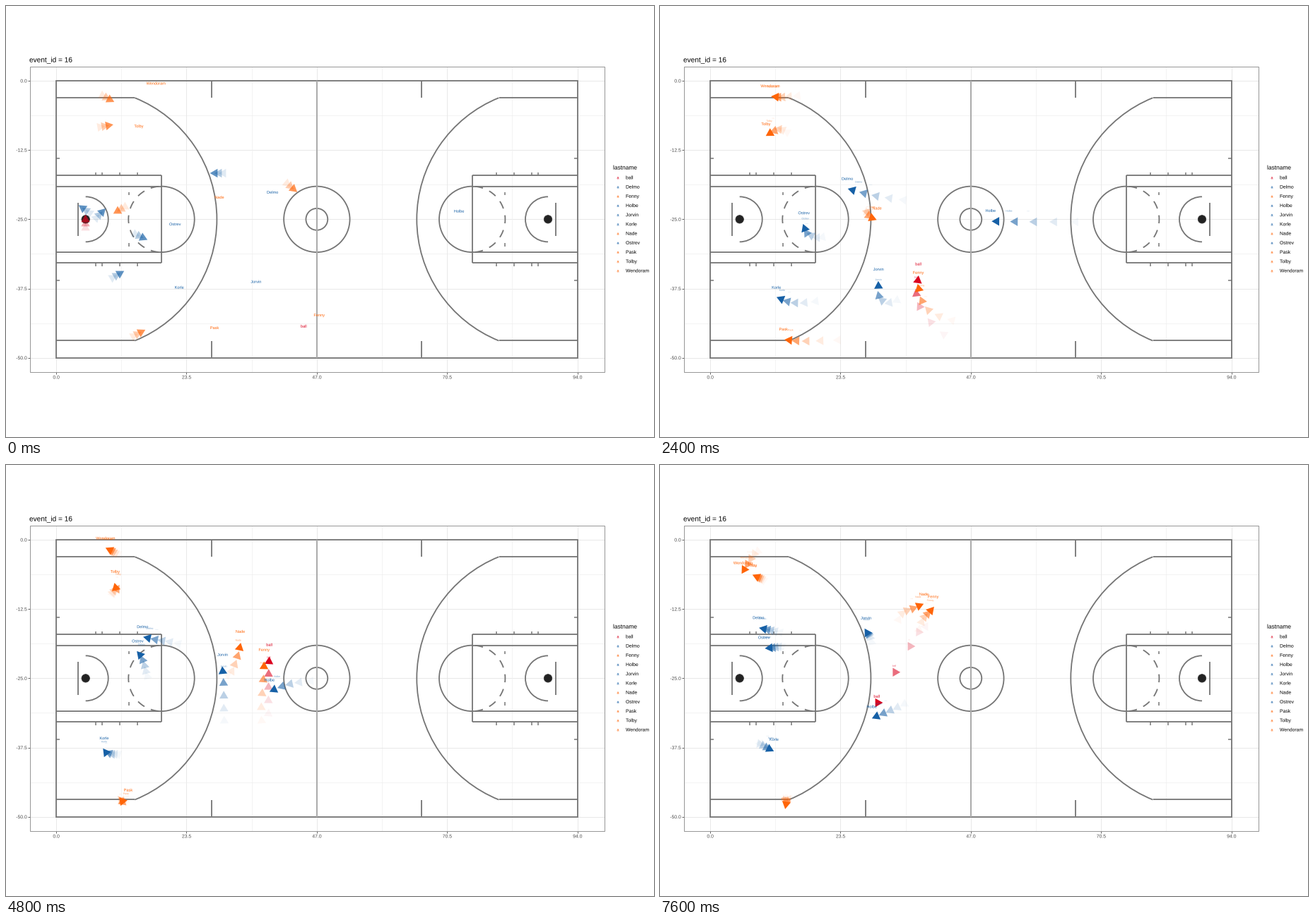
Recreate the animation shown at these times as a matplotlib script. Size 917 by 611 pixels, loop 8 s.

```python
import numpy as np
import matplotlib.pyplot as plt
from matplotlib.animation import FuncAnimation
from matplotlib.patches import Arc, Circle, PathPatch, Polygon, Rectangle
from matplotlib.textpath import TextPath
from matplotlib.transforms import Affine2D

W, H, DPI = 917, 611, 64
FRAMES, INTERVAL = 20, 400
PT = 72 / DPI  # points per pixel

BLUE, ORANGE, RED = "#1660A6", "#FF6508", "#DB0420"
COURT = "#747474"
WAKE_ALPHA = [1, 0.58, 0.29, 0.12, 0.04, 0]
WAKE_TEXT = [1, 0.62, 0.27]

plt.rcParams["font.family"] = "Liberation Sans"
fig = plt.figure(figsize=(W / DPI, H / DPI), dpi=DPI, facecolor="white")
ax = fig.add_axes([0, 0, 1, 1])
ax.set(xlim=(0, W), ylim=(H, 0))
ax.axis("off")


def text(x, y, s, size, color="black", align=0, alpha=1):
    """Outlined text; align is the share of its width left of x."""
    path = TextPath((0, 0), s, size=size)
    x -= align * path.get_extents().x1
    place = Affine2D().scale(1, -1).translate(x, y + 0.36 * size)
    return ax.add_patch(PathPatch(path.transformed(place), fc=color, lw=0,
                                  alpha=alpha, zorder=6))


def line(xs, ys, color=COURT, width=1.8, z=2):
    ax.plot(xs, ys, color=color, lw=width * PT, zorder=z,
            solid_capstyle="butt", solid_joinstyle="miter")


def arc(x, y, r, start=0, end=360):
    """Arc in degrees, counted clockwise on screen."""
    ax.add_patch(Arc((x, y), 2 * r, 2 * r, theta1=start, theta2=end,
                     color=COURT, lw=1.8 * PT, zorder=2))


def triangle(x, y, angle, color, alpha, r=7.2):
    """Triangle pointing along angle, its bounding box centred on x, y."""
    a = angle + np.radians([0, 120, 240])
    pts = r * np.column_stack([np.cos(a), -np.sin(a)])
    pts += (x, y) - (pts.min(axis=0) + pts.max(axis=0)) / 2
    return ax.add_patch(Polygon(pts, fc=color, ec="none", alpha=alpha, zorder=5))


# ---- panel, grid, axes --------------------------------------------------
LEFT, RIGHT, TOP, BOTTOM = 71, 808.7, 106, 498.7
MID_X, MID_Y = (LEFT + RIGHT) / 2, (TOP + BOTTOM) / 2


def draw_panel():
    x0, x1, y0, y1 = 33.5, 846.8, 86, 519
    for i in range(9):
        major = i % 2 == 0
        color, width = ("#E6E6E6", 0.9) if major else ("#EEEEEE", 0.7)
        x = LEFT + (RIGHT - LEFT) * i / 8
        y = TOP + (BOTTOM - TOP) * i / 8
        line([x, x], [y0, y1], color, width, 1)
        line([x0, x1], [y, y], color, width, 1)
        if major:
            line([x, x], [y1, y1 + 3], "#555555", 0.9)
            line([x0 - 3, x0], [y, y], "#555555", 0.9)
            text(x, 526, f"{94 * i / 8:.1f}", 6.8, "#4D4D4D", 0.5)
            text(29.5, y, f"{-50 * i / 8 if i else 0:.1f}", 6.8, "#4D4D4D", 1)
    ax.add_patch(Rectangle((x0, y0), x1 - x0, y1 - y0, fill=False,
                           ec="#8C8C8C", lw=0.9 * PT, zorder=3))
    text(33, 76, "event_id = 16", 10.1)


# ---- court --------------------------------------------------------------
def draw_half(flip):
    """One end of the court; flip mirrors it to the right side."""
    def fx(x):
        return LEFT + RIGHT - x if flip else x

    def seg(xa, ya, xb, yb, width=1.8):
        line([fx(xa), fx(xb)], [MID_Y + ya, MID_Y + yb], width=width)

    def side_arc(x, r, start, end):
        if flip:
            start, end = 180 - end, 180 - start
        arc(fx(x), MID_Y, r, start, end)

    hoop, lane = 112.7, 220
    for s in (-1, 1):
        seg(LEFT, 62 * s, lane, 62 * s)
        seg(LEFT, 46.5 * s, lane, 46.5 * s)
        seg(LEFT, 172 * s, 182, 172 * s)
        seg(291.3, 172.3 * s, 291.3, 196 * s)
        seg(LEFT, 86.8 * s, 75.5, 86.8 * s, 1.5)
        seg(174, 34 * s, 174, 38.3 * s, 1.5)
        for x in (127, 136, 161, 185.7):
            seg(x, 62 * s, x, 66.5 * s, 1.5)
    seg(lane, -62, lane, 62)
    seg(102, -23.7, 102, 23.7)
    side_arc(hoop, 32, -90, 90)
    side_arc(hoop, 185.7, -68, 68)
    side_arc(lane, 46.7, -90, 90)
    for k in range(-3, 4):
        dash = 180 + 26 * k
        side_arc(lane, 46.7, dash - 7, dash + 7)
    ax.add_patch(Circle((fx(hoop), MID_Y), 5.7, fc="#222222", ec="#3A3A3A",
                        lw=0.8 * PT, zorder=4))


def draw_court():
    ax.add_patch(Rectangle((LEFT, TOP), RIGHT - LEFT, BOTTOM - TOP, fill=False,
                           ec=COURT, lw=1.8 * PT, zorder=2))
    draw_half(False)
    draw_half(True)
    arc(MID_X, MID_Y, 46.7)
    arc(MID_X, MID_Y, 15.4)
    line([MID_X, MID_X], [TOP, BOTTOM], "#ABABAB", 2)


# ---- moving parts -------------------------------------------------------
def smooth_path(times, points):
    """Position in every frame on a cubic curve through a few points."""
    t, p = np.array(times), np.array(points, float)
    slope = np.gradient(p, t, axis=0)
    f = np.arange(FRAMES)
    i = np.clip(np.searchsorted(t, f, "right") - 1, 0, len(t) - 2)
    span = (t[i + 1] - t[i])[:, None]
    u = (f - t[i])[:, None] / span
    return ((1 + 2 * u) * (1 - u) ** 2 * p[i] + u * (1 - u) ** 2 * span * slope[i]
            + u * u * (3 - 2 * u) * p[i + 1] + u * u * (u - 1) * span * slope[i + 1])


class Mover:
    """A named marker that faces the way it travels and leaves a fading wake.

    before is where it ended the previous play: x, y and travel direction.
    """

    def __init__(self, name, color, before, points, times=(0, 4, 8, 12, 15, 19)):
        self.name, self.color, self.before = name, color, before
        self.pos = smooth_path(times, points)
        dx, dy = np.gradient(self.pos, axis=0).T
        self.angle = np.arctan2(-dy, dx)

    def marker(self, f, age):
        return triangle(*self.pos[f], self.angle[f], self.color, WAKE_ALPHA[age])

    def label(self, f, age):
        a, (x, y) = self.angle[f], self.pos[f]
        scale = WAKE_TEXT[age]
        return text(x + 7 * np.cos(a), y - 15.3 - 7 * np.sin(a), self.name,
                    5.6 * scale, self.color, 0.5, scale)

    def leftovers(self, f):
        """Wake of the previous play, dying out over the first frames."""
        x, y, direction = self.before
        a = np.radians(direction)
        for back in (2, 1, 0):
            alpha = np.interp(0.75 + 1.1 * back + f, range(len(WAKE_ALPHA)), WAKE_ALPHA)
            if alpha > 0:
                yield triangle(x - 6 * back * np.cos(a), y + 6 * back * np.sin(a),
                               a, self.color, alpha)


MOVERS = [
    Mover("ball", RED, (112.5, 301, 90),
          [(428, 468), (402, 467), (369, 426), (371, 351), (372, 277), (374, 229),
           (356, 257), (310, 337)], (0, 2, 4, 8, 12, 15, 17, 19)),
    Mover("Delmo", BLUE, (109, 288, 145),
          [(384, 280), (305, 270), (243, 254), (200, 246), (169, 238), (146, 233)]),
    Mover("Fenny", ORANGE, (406, 258, -40),
          [(450, 455), (381, 432), (362, 361), (365, 284), (366, 232), (382, 207)]),
    Mover("Holbe", BLUE, (294, 237, 180),
          [(648, 306), (528, 306), (430, 306), (379, 317), (346, 337), (306, 355)]),
    Mover("Jorvin", BLUE, (135, 293, 45),
          [(360, 403), (315, 419), (309, 361), (307, 291), (300, 250), (295, 238)]),
    Mover("Korle", BLUE, (161, 381, 30),
          [(252, 413), (190, 421), (158, 411), (143, 408), (140, 395), (155, 401)]),
    Mover("Nade", ORANGE, (158, 289, 210),
          [(308, 283), (292, 293), (313, 299), (330, 258), (336, 219), (367, 201)]),
    Mover("Ostrev", BLUE, (194, 327, -25),
          [(246, 323), (214, 327), (201, 299), (191, 270), (172, 259), (154, 259)]),
    Mover("Pask", ORANGE, (191, 464, 28),
          [(302, 471), (206, 475), (169, 473), (166, 477), (179, 473), (179, 482)]),
    Mover("Tolby", ORANGE, (146, 170, 10),
          [(194, 189), (167, 175), (149, 183), (156, 173), (147, 165), (137, 160)]),
    Mover("Wendoram", ORANGE, (147, 131, -28),
          [(219, 124), (172, 129), (158, 128), (147, 122), (139, 121), (121, 148)]),
]


def draw_legend():
    text(859, 228.7, "lastname", 8.4)
    for i, m in enumerate(MOVERS):
        y = 243 + 13.2 * i
        triangle(866, y, np.pi / 2, m.color, 0.4, 2)
        text(866, y + 0.5, "a", 5.4, m.color, 0.5, 0.75)
        text(877, y, m.name, 6.8)


draw_panel()
draw_court()
draw_legend()
shown = []


def update(f):
    while shown:
        shown.pop().remove()
    for m in MOVERS:
        shown.extend(m.leftovers(f))
    for age in range(4, -1, -1):
        if f - age >= 1:
            shown.extend(m.marker(f - age, age) for m in MOVERS)
        if f - age >= 0 and age < len(WAKE_TEXT):
            shown.extend(m.label(f - age, age) for m in MOVERS)
    return shown


anim = FuncAnimation(fig, update, frames=FRAMES, interval=INTERVAL,
                     repeat=True, repeat_delay=0, blit=False)
plt.show()
```
